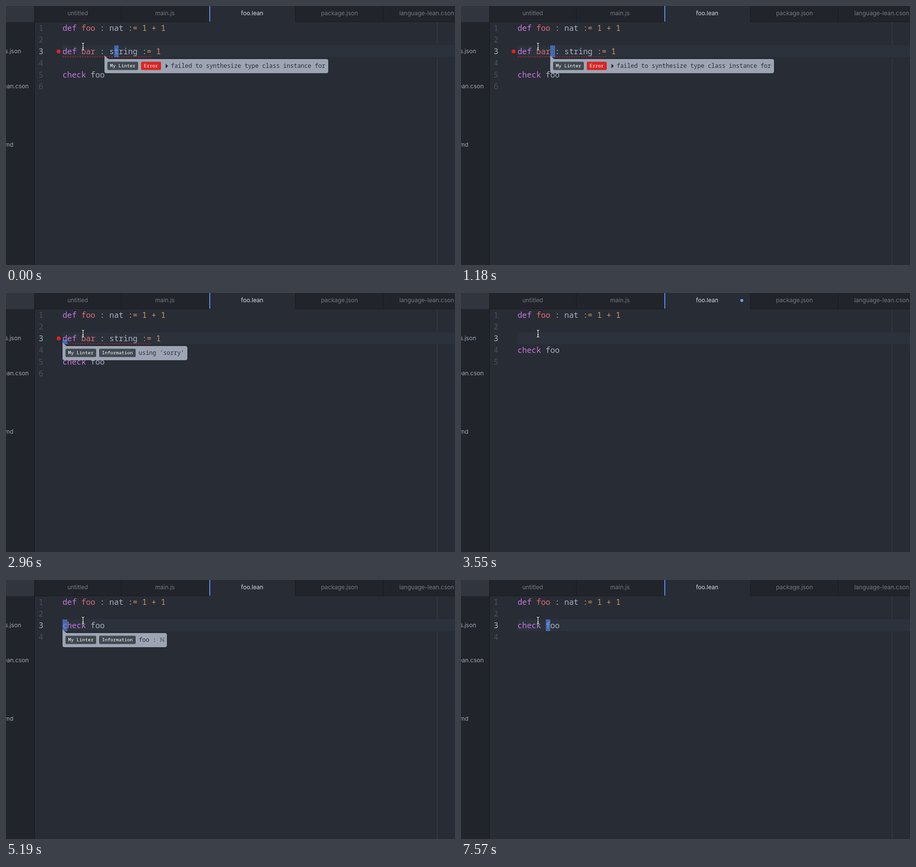
Recreate the animation shown at these times as an HTML page. Size 921 by 532 pixels, loop 8000 ms.

```html
<!DOCTYPE html>
<html lang="en">
<head>
<meta charset="utf-8">
<title>Editor with linter messages</title>
<style>
html, body { margin: 0; width: 100%; height: 100%; overflow: hidden; background: #282c34; }
svg { display: block; }
text { white-space: pre; }

.code { font: 16px "Noto Sans Mono", monospace; fill: #abb2bf; }
.ui { font: 12px Inter, sans-serif; fill: #9da5b4; }
.tab { text-anchor: middle; fill: #737984; }
.file { text-anchor: end; }
.num { fill: #495060; }
.kw { fill: #c678dd; }
.fn { fill: #e06c75; }
.op { fill: #d19a66; }
.crisp { shape-rendering: crispEdges; }

.tip { font: 12px "Noto Sans Mono", monospace; fill: #282c34; }
.box { fill: #9da5b4; }
.badge { fill: #404850; }
.error { fill: #d92525; }
.label { font-size: 9.6px; font-weight: 500; fill: #fff; }

/* One loop is 8 s, so 1% is 80 ms; every change is a hard cut. */
.anim { animation: 8s step-end infinite; }
#cursor { animation-name: cursor; fill: #568af2; fill-opacity: .62; }
#failed { animation-name: failed; }
#sorry { animation-name: sorry; }
#type { animation-name: type; }
#bar, #six { animation-name: first-cut; }
#five { animation-name: second-cut; }
#check { animation-name: check; }
#modified { animation-name: modified; fill: #6c9cf5; }

@keyframes cursor {
  0% { x: 221.6px; y: 81px; height: 24px; opacity: 1; }
  1.75% { x: 240.8px; }
  3.625% { x: 269.6px; }
  9.25% { x: 260px; }
  11.125% { x: 240.8px; }
  12.875% { x: 202.4px; }
  14.75% { x: 183.2px; }
  20.375% { x: 173.6px; }
  24% { x: 144.8px; }
  25.875% { x: 116px; }
  33.25% { opacity: 0; y: 81px; height: 24px; }
  37% { opacity: 1; y: 96px; height: 9px; }
  38.75% { opacity: 1; y: 81px; height: 24px; }
  44.375% { opacity: 0; }
  46.125% { opacity: 1; }
  64.875% { x: 116px; }
  91% { x: 125.6px; }
  92.875% { x: 135.2px; }
  94.625%, to { x: 173.6px; y: 81px; height: 24px; opacity: 1; }
}
@keyframes failed {
  0% { transform: translate(202px, 109px); opacity: 1; }
  1.75% { transform: translate(222px, 109px); }
  3.625% { transform: translate(270px, 109px); }
  9.25% { transform: translate(260px, 109px); }
  14.75% { transform: translate(183px, 109px); }
  22.125% { transform: translate(174px, 109px); }
  27.625%, to { transform: translate(174px, 109px); opacity: 0; }
}
@keyframes sorry {
  0% { opacity: 0; }
  27.625% { opacity: 1; }
  44.375%, to { opacity: 0; }
}
@keyframes type {
  0% { opacity: 0; }
  64.875% { opacity: 1; }
  91%, to { opacity: 0; }
}
@keyframes first-cut {
  0% { opacity: 1; }
  38.75%, to { opacity: 0; }
}
@keyframes second-cut {
  0% { opacity: 1; }
  46.125%, to { opacity: 0; }
}
@keyframes check {
  0% { transform: translateY(147px); }
  38.75% { transform: translateY(123px); }
  46.125%, to { transform: translateY(99px); }
}
@keyframes modified {
  0% { r: 0px; }
  42.5% { r: 2px; }
  44.375% { r: 3.1px; }
  53.625% { r: 1px; }
  55.5%, to { r: 0px; }
}
</style>
</head>
<body>
<svg width="921" height="532" viewBox="0 0 921 532">
  <defs>
    <g id="source">
      <rect class="badge" x="6" y="5.5" width="63" height="17" rx="2.5"/>
      <text class="label" x="11.6" y="17">My Linter</text>
    </g>
    <g id="info">
      <use href="#source"/>
      <rect class="badge" x="75" y="5.5" width="75" height="17" rx="2.5"/>
      <text class="label" x="80.8" y="17">Information</text>
    </g>
    <path id="beam" fill="none" stroke-linecap="round" d="M155.5 76q2 0 2.5 1.5q.5-1.5 2.5-1.5M158 77.5V89M155.5 90.5q2 0 2.5-1.5q.5 1.5 2.5 1.5M156.5 86h3"/>
  </defs>

  <!-- panes and tabs -->
  <g class="crisp">
    <rect width="921" height="532" fill="#282c34"/>
    <rect width="921" height="33" fill="#21252b"/>
    <rect width="58" height="532" fill="#21252b"/>
    <rect width="58" height="33" fill="#31353d"/>
    <path fill="#181a1f" d="M58 0h1v532h-1zM59 32h862v1h-862zM236 0h1v32h-1zM593 0h1v32h-1zM773 0h1v32h-1z"/>
    <rect x="417" width="176" height="33" fill="#282c34"/>
    <rect x="417" width="2" height="32" fill="#568af2"/>
    <rect x="884" y="33" width="1" height="499" fill="#3a3f48"/>
    <rect x="116" y="81" width="805" height="24" fill="#2c323c"/>
  </g>
  <g class="ui">
    <text class="tab" x="147" y="19">untitled</text>
    <text class="tab" x="326" y="19">main.js</text>
    <text class="tab" x="505" y="19" style="fill:#d7dae0">foo.lean</text>
    <text class="tab" x="684" y="19">package.json</text>
    <text class="tab" x="863" y="19">language-lean.cson</text>
    <text class="file" x="31" y="97">s.json</text>
    <text class="file" x="46.5" y="169">lean.cson</text>
    <text class="file" x="15" y="289">md</text>
  </g>
  <circle id="modified" class="anim" cx="576" cy="15.3"/>

  <!-- buffer -->
  <g class="code">
    <g class="num">
      <text x="67" y="51">1</text>
      <text x="67" y="75">2</text>
      <text x="67" y="99" style="fill:#abb2bf">3</text>
      <text x="67" y="123">4</text>
      <text id="five" class="anim" x="67" y="147">5</text>
      <text id="six" class="anim" x="67" y="171">6</text>
    </g>
    <text x="116" y="51"><tspan class="kw">def</tspan> <tspan class="fn">foo</tspan> : nat <tspan class="op">:= 1 + 1</tspan></text>
    <g id="bar" class="anim">
      <circle class="error" cx="108" cy="93.3" r="4.1"/>
      <text x="116" y="99"><tspan class="kw">def</tspan> <tspan class="fn">bar</tspan> : string <tspan class="op">:= 1</tspan></text>
      <path class="crisp" d="M116 104.5H298" stroke="#d92525" stroke-dasharray="3 2"/>
    </g>
    <text id="check" class="anim" x="116"><tspan class="kw">check</tspan> foo</text>
  </g>
  <rect id="cursor" class="anim crisp" width="9.6"/>

  <!-- linter messages -->
  <g class="tip">
    <g id="failed" class="anim">
      <path class="box" d="M0-7.5L8 0H455q4 0 4 4V25q0 4-4 4H4q-4 0-4-4z"/>
      <use href="#source"/>
      <rect class="error" x="75" y="5.5" width="41" height="17" rx="2.5"/>
      <text class="label" x="80.8" y="17">Error</text>
      <path d="M125.5 9.5l5 4.7l-5 4.7z"/>
      <text x="136.2" y="18">failed to synthesize type class instance for</text>
    </g>
    <g transform="translate(116 109)">
      <g id="sorry" class="anim">
        <path class="box" d="M0-7.5L8 0H252q4 0 4 4V25q0 4-4 4H4q-4 0-4-4z"/>
        <use href="#info"/>
        <text x="156" y="18">using 'sorry'</text>
      </g>
      <g id="type" class="anim">
        <path class="box" d="M0-7.5L8 0H210q4 0 4 4V25q0 4-4 4H4q-4 0-4-4z"/>
        <use href="#info"/>
        <text x="156.4" y="18">foo : <tspan style="font:11.5px 'DejaVu Serif',serif;fill:#454b57">ℕ</tspan></text>
      </g>
    </g>
  </g>

  <use href="#beam" stroke="#15171b" stroke-width="2.8"/>
  <use href="#beam" stroke="#fff" stroke-width="1.2"/>
</svg>
</body>
</html>
```
